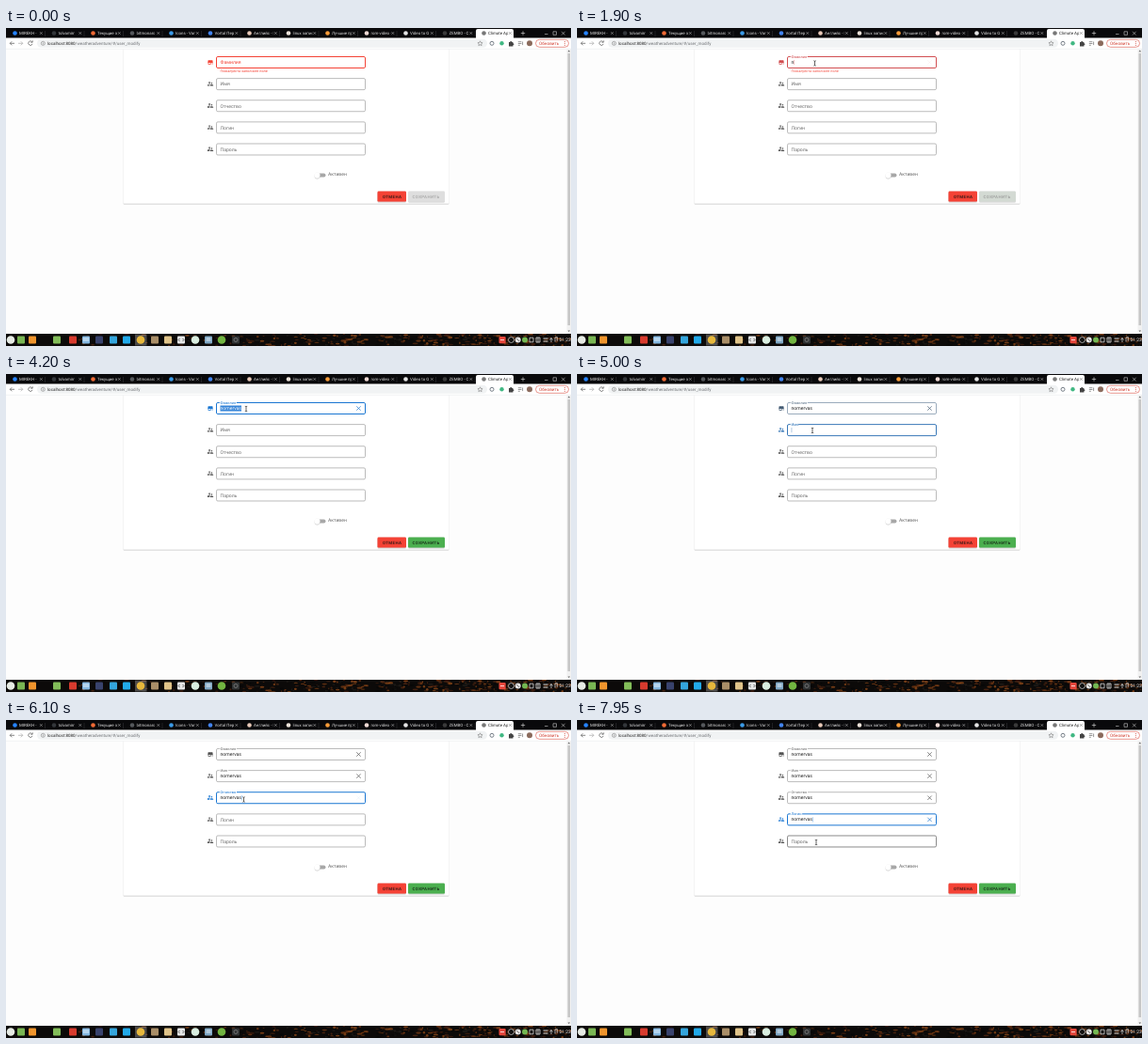
Animation of 600x338 px, one loop 8 s. Source, as an HTML page:

```html
<!DOCTYPE html>
<html lang="ru">
<head>
<meta charset="utf-8">
<title>Форма пользователя</title>
<style>
  html, body { margin: 0; width: 100%; height: 100%; overflow: hidden; background: #fdfdfd; }
  svg { display: block; }
  #stage { width: 100vw; height: 100vh; }
  text { font-family: Roboto, "Open Sans", sans-serif; white-space: pre; text-rendering: geometricPrecision; }
</style>
</head>
<body>
<svg id="stage" viewBox="0 0 600 338">
  <defs>
    <filter id="shadow" x="-10%" y="-10%" width="120%" height="125%">
      <feDropShadow dx="0" dy=".6" stdDeviation=".7" flood-opacity=".34"/>
    </filter>
    <path id="store" d="M12 18H6V14H12M21 14V12L20 7H4L3 12V14H4V20H14V14H18V20H20V14M20 4H4V6H20Z"/>
    <g id="people">
      <path fill-rule="evenodd" d="M9 4.7a3.3 3.3 0 1 0 .01 0ZM9 6.7a1.3 1.3 0 1 1-.01 0Z"/>
      <circle cx="16.7" cy="9.5" r="2.6"/>
      <path fill-rule="evenodd" d="M1.5 19V16.5C1.5 14 6 13 9 13Q10.3 13 11.4 13.3Q9 14.6 9 17V19ZM3.5 17H7.3Q7.5 15.8 8.2 15Q4 15.2 3.5 17Z"/>
      <path d="M11 19V16.8C11 15 14.5 14 16.5 14S22.5 15 22.5 16.8V19Z"/>
    </g>
  </defs>
</svg>
<script>
const LOOP = 8000;
const FULL = "nomervas";
const BLUE = [25, 118, 210], RED = [244, 67, 54], GREY = [150, 150, 150],
      DARK = [75, 75, 75], LABEL = [108, 108, 108], ICON = [82, 82, 82];
const NS = "http://www.w3.org/2000/svg";
const stage = document.getElementById("stage");

function set(node, attrs) {
  for (const key in attrs) node.setAttribute(key, attrs[key]);
  return node;
}
function add(parent, tag, attrs, content) {
  const node = set(document.createElementNS(NS, tag), attrs);
  if (content) node.textContent = content;
  return parent.appendChild(node);
}
const rect = (x, y, width, height, fill, more, parent = stage) =>
  add(parent, "rect", { x, y, width, height, fill, ...more });
const dot = (cx, cy, r, fill, more, parent = stage) =>
  add(parent, "circle", { cx, cy, r, fill, ...more });
const line = (d, stroke, width = .8, parent = stage) =>
  add(parent, "path", { d, stroke, fill: "none", "stroke-width": width });
const label = (x, y, size, fill, content, more, parent = stage) =>
  add(parent, "text", { x, y, "font-size": size, fill, ...more }, content);

const clamp = v => Math.max(0, Math.min(1, v));
const ease = v => v * v * (3 - 2 * v);
const since = (t, from, span = 300) => ease(clamp((t - from) / span));
const mix = (a, b, k) => a.map((v, i) => v + (b[i] - v) * k);
const rgb = c => `rgb(${c.map(Math.round)})`;

let seed = 11;
const random = () => (seed = seed * 16807 % 2147483647) / 2147483647;

function drawTabs() {
  rect(0, 0, 600, 11, "#09090b");
  const tabs = [
    ["MIREKH -", "#2684ff"], ["tolvamirr", "#33363a"], ["Текущие з", "#f06a35"],
    ["bitmonarc", "#55585c"], ["Icons - Vor", "#3b9be8"], ["Vortal Пер", "#4285f4"],
    ["Английс - В", "#e8c9b8"], ["linux запис", "#eee3da"], ["Лучшие пр", "#f59b38"],
    ["rom-video -", "#efd9d4"], ["Video to G", "#e4e4e4"], ["ZEMBO - С", "#3a3a3a"],
    ["Climate Ap", "#777"]
  ];
  tabs.forEach(([title, color], i) => {
    const x = 3 + i * 41.5, active = i === tabs.length - 1;
    if (active) add(stage, "path", { d: `M${x - 2} 11V3Q${x - 2} 1 ${x} 1H${x + 36}Q${x + 38} 1 ${x + 38} 3V11Z`, fill: "#fff" });
    else line(`M${x + 38.5} 3V9`, "#44464a", .4);
    dot(x + 6.5, 5.5, 2.3, color);
    const clip = add(stage, "svg", { x: x + 11, y: 0, width: 21, height: 11 });
    label(0, 7, 4.4, active ? "#222" : "#dedede", title, {}, clip);
    line(`M${x + 33} 4.2l2.6 2.6m0-2.6l-2.6 2.6`, active ? "#555" : "#ccc", .5);
  });
  line("M546.8 5.5h4.4M549 3.3v4.4", "#ddd", .6);
  line("M572 6.5h3.5M581 3.8h3.5v3.5h-3.5ZM590 3.8l3.6 3.6m0-3.6l-3.6 3.6", "#ccc", .6);
}

function drawToolbar() {
  rect(0, 10.5, 600, 12, "#fff");
  rect(33, 11.8, 478, 9, "#f1f3f4", { rx: 4.5 });
  line("M9 16.3H4.2m2-2l-2 2l2 2", "#555", .7);
  line("M13 16.3H17.8m-2-2l2 2l-2 2", "#aaa", .7);
  line("M27.5 14.6a2.2 2.2 0 1 0 .5 2.3M28.2 13.3v1.9h-1.9", "#555", .7);
  dot(39.3, 16.3, 2, "none", { stroke: "#666", "stroke-width": .5 });
  line("M39.3 16v1.3M39.3 15v.5", "#666", .5);
  const url = label(44, 17.9, 4.5, "#222", "localhost:8080");
  add(url, "tspan", { fill: "#6b6e72" }, "/weatheradventure/#/user_modify");
  line("M503.5 13.8l.8 1.7l1.8.2l-1.4 1.2l.4 1.8l-1.6-.9l-1.6.9l.4-1.8l-1.4-1.2l1.8-.2Z", "#666", .5);
  dot(516, 16.3, 2, "none", { stroke: "#777f88", "stroke-width": 1 });
  dot(526.5, 16.3, 2.2, "#41b883");
  add(stage, "path", { d: "M534 15h1.2a1 1 0 0 1 2 0h1.2v1.2a1 1 0 0 1 0 2v1.2h-4.4Z", fill: "#444" });
  line("M543.8 14.7h3.6M543.8 16.5h3.6M543.8 18.3h2M548.6 14.5v3.6", "#555", .6);
  dot(556, 16.3, 3, "#8a6a5c");
  rect(562.5, 12.3, 35, 8, "#fff", { rx: 4, stroke: "#e06a60", "stroke-width": .7 });
  label(566, 18, 4.7, "#d23f31", "Обновить");
  [14.4, 16.3, 18.2].forEach(y => dot(593.3, y, .5, "#d23f31"));
  line("M0 22.3H600", "#e2e4e6", .5);
}

function drawTaskbar() {
  const bar = add(stage, "svg", { x: 0, y: 325, width: 600, height: 13 });
  rect(0, 0, 600, 13, "#0c0a09", {}, bar);
  const leaves = ["#8a4416", "#47210f", "#a9561c", "#23201c", "#050606", "#5f2d12"];
  for (let i = 0; i < 420; i++) {
    add(bar, "ellipse", {
      cx: 600 * Math.sqrt(random()), cy: random() * 13, rx: .5 + random() * 2.6, ry: .4 + random() * .9,
      fill: leaves[Math.floor(random() * leaves.length)], opacity: .65
    });
  }
  rect(137, .5, 12.5, 12, "#a9a9a9", { opacity: .4 }, bar);
  const round = [[5, "#e6ebe4"], [143, "#e7b83c"], [201, "#d9eee0"], [229, "#72b541"]];
  const square = [[16, "#79b653"], [28, "#f0952d"], [54, "#82bd59"], [71, "#d73b2e"],
    [85, "#84b7e0"], [99, "#39436d"], [114, "#34a5dc"], [128, "#22aaea"], [158, "#a98e68"],
    [172, "#e0c48a"], [186, "#e7e8e8"], [215, "#7fa7c4"], [244, "#303334"]];
  round.forEach(([x, color]) => dot(x, 6.5, 4.3, color, {}, bar));
  square.forEach(([x, color]) => rect(x - 4, 2.5, 8, 8, color, { rx: 1 }, bar));
  line("M82 5H88M82 7H88M212.5 5H217.5M212.5 7H217.5", "#fff", .8, bar);
  line("M184.5 5l-1.5 1.5l1.5 1.5M187.5 5l1.5 1.5l-1.5 1.5", "#333", .8, bar);
  dot(244, 6.5, 2, "none", { stroke: "#888", "stroke-width": .7 }, bar);
  rect(523.5, 3, 7.2, 7.2, "#e5473c", { rx: 1 }, bar);
  line("M525 6.6h4", "#fff", .8, bar);
  dot(536.5, 6.5, 3, "#111", { stroke: "#ddd", "stroke-width": .7 }, bar);
  dot(543.7, 6.5, 3, "#e6e6e6", {}, bar);
  line("M542.2 5l3 3", "#333", .7, bar);
  dot(551, 6.5, 3, "#74b752", {}, bar);
  line("M556 4.2h4v4.6h-4ZM563 4h4v5h-4ZM565 4v5", "#ddd", .8, bar);
  line("M570.5 5h5M570.5 8h5", "#d8d8d8", 1.1, bar);
  line("M579 9V4.5l-1.6 2M579 4.5l1.6 2M583 8.5V4l2.3-.5v4.2", "#eee", .7, bar);
  label(587.5, 8.3, 4.9, "#f0f0f0", "01:23", {}, bar);
}

function drawPage() {
  rect(0, 22, 600, 304, "#fdfdfd");
  rect(124.5, 18, 346, 168.5, "#fff", { rx: 1, filter: "url(#shadow)" });
  rect(595.5, 22, 4.5, 303, "#f1f1f1");
  rect(596.5, 27, 2.5, 289, "#c6c6c6");
  add(stage, "path", { d: "M596.5 25.2l1.3-1.6l1.3 1.6ZM596.5 321.5l1.3 1.6l1.3-1.6Z", fill: "#666" });
  rect(329, 154.6, 10.5, 4, "#a7a7a7", { rx: 2 });
  dot(330.5, 156.5, 3, "#fff", { filter: "url(#shadow)" });
  label(342, 157.2, 5.05, "#666", "Активен");
}

function makeButton(x, width, fill, textX, title) {
  const box = rect(x, 173.5, width, 11, fill, { rx: 1.2, filter: "url(#shadow)" });
  const text = label(textX, 180.7, 4.4, "#221513", title, { "font-weight": 500, "letter-spacing": .39 });
  return { box, text };
}

// focus / blur / fill are moments in ms
const fields = [
  { name: "Фамилия", focus: 1650, blur: 4800, fill: 1850 },
  { name: "Имя", focus: 4800, blur: 5700, fill: 5150 },
  { name: "Отчество", focus: 5700, blur: 6420, fill: 6050 },
  { name: "Логин", focus: 6420, blur: Infinity, fill: 6650 },
  { name: "Пароль", focus: Infinity, blur: Infinity, fill: Infinity }
];

function makeField(field, i) {
  const y = field.y = 36.5 + 23.12 * i;
  field.icon = add(stage, "use", { href: i ? "#people" : "#store", transform: `translate(213.4 ${y - 3.8}) scale(.3)` });
  field.border = rect(223.5, y - 6, 158, 12, "#fff", { rx: 1.4 });
  field.notch = rect(226.7, y - 7, 0, 2, "#fff");
  field.label = label(227.5, y + 1.8, 5.1, "#666", field.name);
  field.mark = rect(227.5, y - 3, 0, 6, "#3584d8");
  field.value = label(227.5, y + 1.6, 5.1, "#222", "");
  field.caret = rect(0, y - 2.6, .35, 5.2, "#222");
  field.clear = line(`M372.3 ${y - 2.2}l4.4 4.4m0-4.4l-4.4 4.4`, "#555", .7);
}

function typed(field, i, t) {
  if (t < field.fill) return "";
  if (i) return FULL;
  return t < 2900 ? FULL.slice(0, Math.min(7, 1 + Math.floor((t - field.fill) / 105))) : FULL;
}

function drawField(field, i, t, mouse) {
  const { y, focus, blur, fill } = field;
  const active = t >= focus && t < blur;
  const selected = i === 0 && active && t >= 3600;
  const glow = since(t, focus) - since(t, blur);
  const hover = mouse.x > 223 && mouse.x < 382 && mouse.y > y - 12 && mouse.y < y + 6.5;
  const error = i ? 0 : 1 - since(t, fill, 200);
  const tint = base => rgb(mix(mix(base, BLUE, glow), RED, error));

  set(field.border, { stroke: tint(hover ? DARK : GREY), "stroke-width": .65 + .35 * Math.max(glow, error) });
  set(field.icon, { fill: tint(ICON) });

  const float = since(t, focus, 250);
  set(field.label, { "font-size": 5.1 - 1.3 * float, y: y + 1.8 - 6.8 * float, fill: tint(LABEL) });
  set(field.notch, { width: float ? float * (field.label.getComputedTextLength() + 1.6) : 0 });

  field.value.textContent = typed(field, i, t);
  const width = field.value.textContent ? field.value.getComputedTextLength() : 0;
  set(field.value, { fill: selected ? "#fff" : "#222" });
  set(field.mark, { width: selected ? width : 0 });

  const typing = i === 0 && t > fill && t < 2900;
  const lastKey = t < fill ? focus : i ? fill : 2900;
  const lit = typing || Math.floor((t - lastKey) / 500) % 2 === 0;
  set(field.caret, { x: 227.8 + width, opacity: active && lit && !selected ? 1 : 0, fill: tint([34, 34, 34]) });
  set(field.clear, { stroke: tint(ICON), opacity: since(t, fill) });
}

function makeDropdown() {
  const menu = add(stage, "g", { filter: "url(#shadow)" });
  rect(227, 111.5, 142.5, 61, "#fff", { rx: .6 }, menu);
  ["08.06.2020", "asd", "08.02.2021", "asdsa", "математика"].forEach((item, i) =>
    label(231, 121 + i * 11.25, 4.35, "#111", item, { "font-weight": 700 }, menu));
  return menu;
}

function makePointer() {
  const pointer = add(stage, "g", {});
  const arrow = add(pointer, "path", { d: "M0 0V5.2L1.2 4.1L2 6L2.9 5.6L2.1 3.8H3.7Z", fill: "#111", stroke: "#fff", "stroke-width": .3 });
  const beam = line("M-1.2-2.7Q0-2.7 0-2V2Q0 2.7-1.2 2.7M1.2-2.7Q0-2.7 0-2M0 2Q0 2.7 1.2 2.7", "#222", .7, pointer);
  return { pointer, arrow, beam };
}

const path = [
  [300, 531, 331], [1000, 238, 48], [1250, 238, 48], [1550, 252, 37], [2600, 254, 39],
  [3300, 254, 39], [3550, 255, 37], [4350, 255, 37], [4700, 250, 60], [5200, 250, 60],
  [5450, 252.5, 84.5], [6150, 252.5, 84.5], [6380, 252, 107], [6800, 252.5, 109.5], [7400, 252.5, 109.5], [7700, 254, 130]
];
function mouseAt(t) {
  const next = path.findIndex(p => p[0] > t);
  const last = path.length - 1;
  const [t1, x1, y1] = path[next < 0 ? last : next];
  const [t0, x0, y0] = path[next < 0 ? last : Math.max(0, next - 1)];
  const k = t1 > t0 ? ease(clamp((t - t0) / (t1 - t0))) : 0;
  return { x: x0 + (x1 - x0) * k, y: y0 + (y1 - y0) * k };
}

drawPage();
fields.forEach(makeField);
const hint = label(227.5, 46.7, 3.75, rgb(RED), "Пожалуйста заполните поле");
makeButton(394.5, 30.5, "#f44336", 400, "ОТМЕНА");
const save = makeButton(427, 39, "#e0e0e0", 431.5, "СОХРАНИТЬ");
const menu = makeDropdown();
drawTabs();
drawToolbar();
drawTaskbar();
const cursor = makePointer();

function render(t) {
  const mouse = mouseAt(t);
  fields.forEach((field, i) => drawField(field, i, t, mouse));

  const valid = since(t, fields[0].fill);
  set(hint, { opacity: 1 - valid, y: 46.7 - 2 * valid });
  set(save.box, { fill: rgb(mix([222, 222, 222], [76, 175, 80], valid)) });
  set(save.text, { fill: rgb(mix([166, 166, 166], [20, 35, 21], valid)) });
  set(menu, { visibility: t >= 6600 && t < 6900 ? "visible" : "hidden" });

  const overField = fields.some(f => Math.abs(mouse.y - f.y) < 6.5) && mouse.x > 223 && mouse.x < 382;
  set(cursor.pointer, { transform: `translate(${mouse.x} ${mouse.y})`, opacity: t > 300 ? 1 : 0 });
  set(cursor.arrow, { opacity: overField ? 0 : 1 });
  set(cursor.beam, { opacity: overField ? 1 : 0 });
}

const start = performance.now();
function tick(now) {
  render(Math.max(0, now - start) % LOOP);
  requestAnimationFrame(tick);
}
render(0);
requestAnimationFrame(tick);
</script>
</body>
</html>
```
